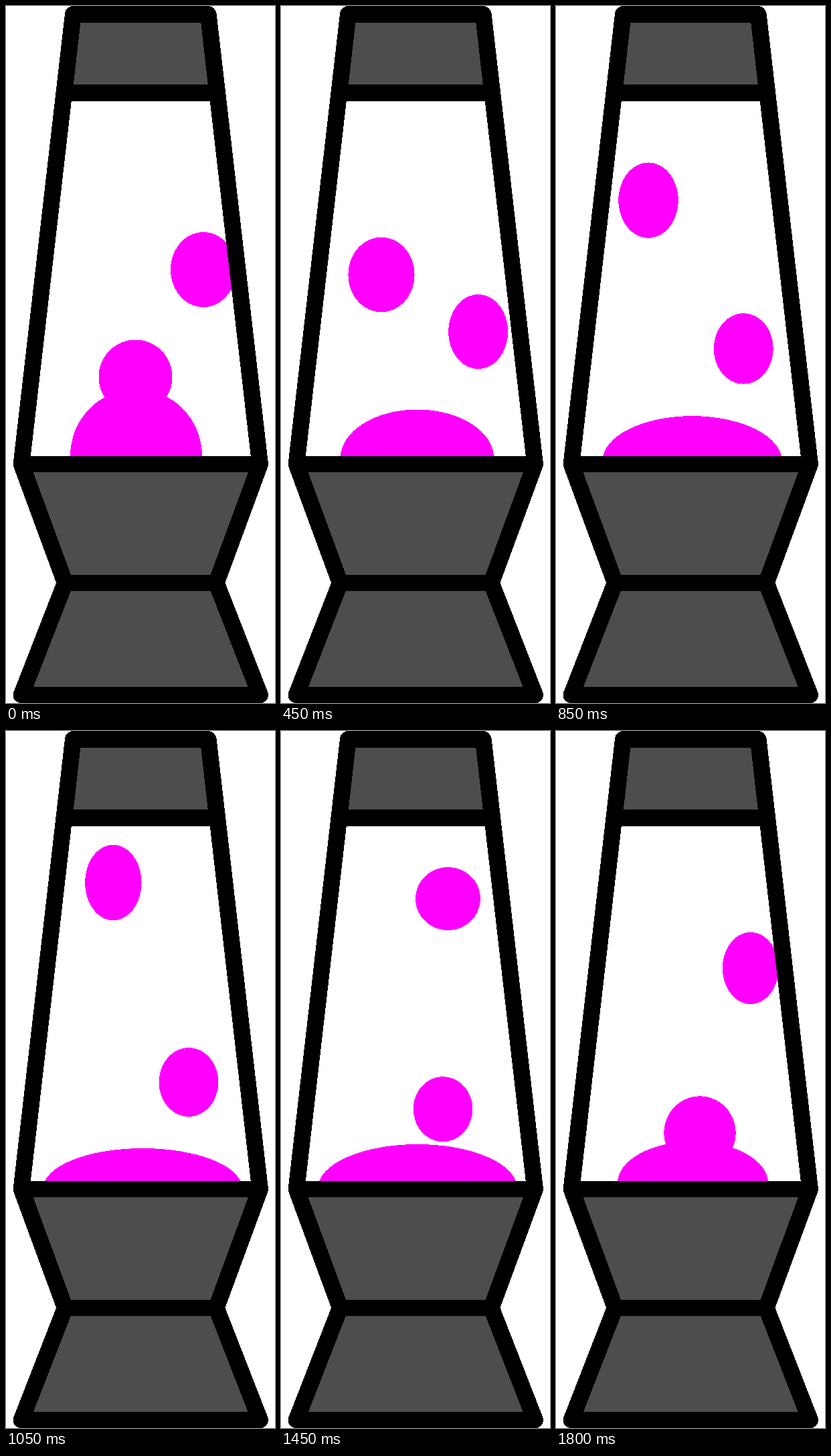
An HTML page that plays this animation: 402x1039 px, repeating every 1850 ms.

```html
<!DOCTYPE html>
<html lang="en">
<head>
<meta charset="utf-8">
<title>Lava lamp</title>
<style>
  html, body { margin: 0; width: 100%; height: 100%; overflow: hidden; background: #fff; }
  svg { display: block; width: 402px; height: 1039px; shape-rendering: crispEdges; }
  .wax { fill: #f0f; }
  .body { fill: #4d4d4d; stroke: #000; stroke-width: 24.7; stroke-linejoin: round; }
  .glass { fill: none; }
</style>
</head>
<body>
<svg viewBox="0 0 402 1039">
  <g class="wax">
    <ellipse id="pool"/>
    <ellipse id="riser"/>
    <ellipse id="sinker"/>
  </g>
  <g class="body" transform="translate(201.3 0)">
    <path d="M-101 12.5H101L114.3 129.5H-114.3Z"/>
    <path d="M-178.3 682.9H178.3L113 860H-113Z"/>
    <path d="M-113 860H113L178.3 1027H-178.3Z"/>
    <path class="glass" d="M-101 12.5H101L178.3 682.9H-178.3Z"/>
  </g>
</svg>
<script>
  const LOOP = 1850, STEP = 50;

  // A blob rises in one loop and sinks in the next, so both blobs share this route.
  const route = { // ms: [x, y]
    0: [193.5, 553], 200: [178, 511.5], 450: [150, 400.5], 700: [121.3, 337.3],
    1050: [160.3, 226], 1200: [193, 190], 1450: [249.5, 250], 1800: [290.8, 353.5],
    1850: [295, 393], 2050: [283, 405], 2300: [294.7, 485.5], 3650: [215, 599]
  };
  route[2900] = [273, 523.5];

  const squash = { // ms: [rx, ry]
    0: [55, 55.5], 1050: [42.3, 56.3], 1450: [48.5, 47], 1800: [42, 53.5],
    1850: [49, 56], 2300: [44.5, 55.5], 3300: [44.3, 48.5]
  };

  const swell = { // ms: [centre x, half width, top]
    0: [194.5, 98.5, 571], 200: [199, 91, 568], 450: [203.5, 114.7, 601.5],
    700: [203, 123.5, 603], 1050: [204.3, 148.5, 622], 1450: [204, 149, 616],
    1800: [204.5, 112.5, 612]
  };

  // Linear interpolation between keys, wrapping to the first key after `period`.
  function sample(keys, t, period) {
    const times = Object.keys(keys).map(Number);
    const from = times.findLast(time => time <= t);
    const to = times.find(time => time > t) ?? period;
    const a = keys[from], b = keys[to % period];
    return a.map((value, i) => value + (b[i] - value) * (t - from) / (to - from));
  }

  function place(id, cx, cy, rx, ry) {
    const blob = document.getElementById(id);
    Object.entries({ cx, cy, rx, ry }).forEach(([name, value]) => blob.setAttribute(name, value));
  }

  function drawBlob(id, t) {
    place(id, ...sample(route, t, 2 * LOOP), ...sample(squash, t, 2 * LOOP));
  }

  function draw(t) {
    const [x, halfWidth, top] = sample(swell, t, LOOP);
    const y = 649 + 0.22 * halfWidth; // a wider pool sits deeper
    place('pool', x, y, halfWidth, y - top);
    drawBlob('riser', t);
    drawBlob('sinker', t + LOOP);
  }

  let start;
  function tick(now) {
    start ??= now;
    draw(Math.floor((now - start) % LOOP / STEP) * STEP);
    requestAnimationFrame(tick);
  }
  draw(0);
  requestAnimationFrame(tick);
</script>
</body>
</html>
```
